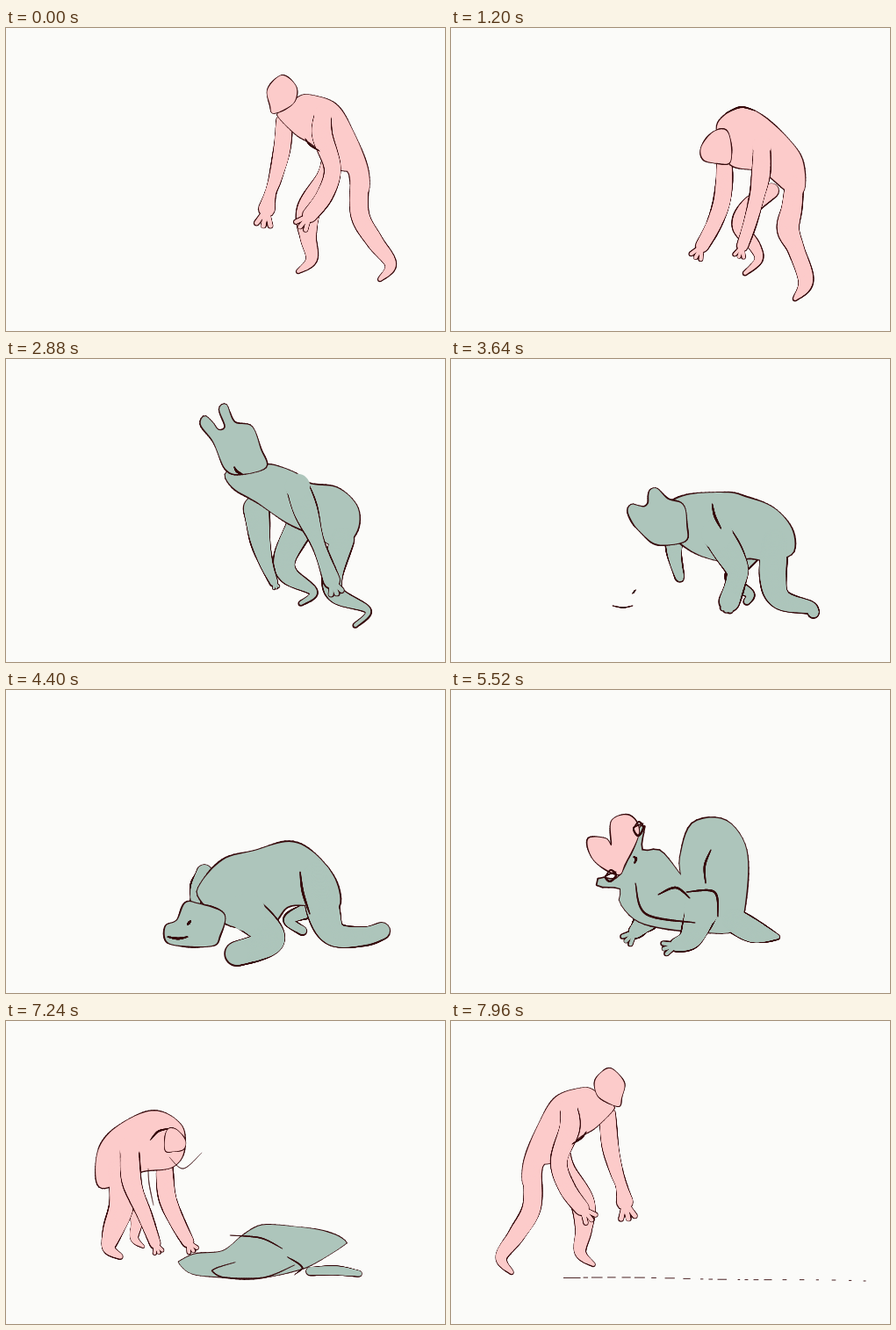
Write an HTML page with a canvas that moves like this. It is 500 px wide and 345 px high and loops after 8000 ms.

```html
<!DOCTYPE html>
<html lang="en">
<head>
<meta charset="utf-8">
<title>Shape shifter</title>
<style>
html, body { margin: 0; width: 100%; height: 100%; overflow: hidden; background: #fbfbf9; }
canvas { display: block; width: 100vw; height: 100vh; }
</style>
</head>
<body>
<canvas id="stage"></canvas>
<script>
const W = 500, H = 345, LOOP = 8000, STEP = 120;
const PAPER = '#fbfbf9', INK = '#360a0c';
const PINK = [252, 203, 202], GREEN = [173, 197, 187];

const clamp = v => Math.max(0, Math.min(1, v));
const mix = (a, b, u) => a + (b - a) * u;
const isLimb = name => /^(arm|leg)/.test(name);
const isLine = name => /^mark/.test(name);

// Limbs are joints x,y,radius; torso and head are outlines; marks are creases.
const parse = text => Object.fromEntries(text.trim().split('\n').map((row, i) => {
  const [name, ...points] = row.trim().split(/\s+/);
  return [name === 'mark' ? name + i : name, points.map(p => p.split(',').map(Number))];
}));

const stand = parse(`
  legF 370,145,9 364,170,10 345,207,13 344,237,9 348,263,6 333,277,2
  armF 317,106,9 314,140,9 307,170,7 301,188,6 297,206,9
  torso 309,99 318,93 331,80 345,76 376,87 396,119 412,160 412,188 395,184 390,164 378,160 351,134 330,121
  legN 403,168,10 403,212,10 420,243,9 438,269,6 426,286,2
  head 314,54 330,66 329,83 318,92 304,97 301,88 298,70
  armN 361,98,9 360,122,11 372,160,9 363,190,9 346,213,8
  mark 341,126 346,133 357,140`);

const stoop = parse(`
  legF 365,185,8 340,204,10 330,226,9 346,249,6 350,264,4 335,279,2
  armF 311,150,8 311,175,9 308,200,9 299,224,8 286,248,7
  torso 303,118 310,101 331,91 352,98 382,124 400,150 402,185 385,187 355,164 318,155
  legN 391,178,10 388,205,11 384,229,12 393,252,9 404,288,8 392,308,2
  head 312,116 298,119 285,136 288,150 305,154 318,152 318,128
  armN 354,134,9 353,165,10 349,190,8 341,220,7 332,248,6
  mark 313,97 330,90 346,94`);

const beast = parse(`
  legF 335,190,15 318,225,12 322,246,10 350,265,4 336,278,2
  armF 285,170,14 289,203,11 296,232,7 305,254,4
  torso 252,128 295,120 328,129 346,142 378,147 400,168 400,195 380,215 350,200 318,185 286,163 258,146
  legN 383,205,13 372,245,11 377,269,9 412,286,3 398,303,2
  head 236,94 222,75 226,65 235,72 242,81 250,77 243,57 251,52 260,72 280,77 290,103 296,123 268,131 250,125
  armN 332,145,12 341,172,13 356,212,7 371,252,9
  mark 260,123 263,128 269,131`);

const crawl = parse(`
  legF 345,250,8 322,262,5 338,274,4
  armF 226,207,8 217,225,6 216,242,5
  torso 221,238 222,220 248,193 283,183 322,173 350,185 375,216 378,248 345,245 320,247 300,268 255,268
  legN 354,212,16 361,250,18 374,278,13 408,280,10 428,274,9
  head 217,243 204,243 195,262 182,269 183,286 200,291 235,291 243,280 248,255
  armN 274,253,19 302,284,15 263,300,13
  mark 335,207 338,230 346,255
  mark 184,281 196,283 207,281
  mark 207,267 210,263`);

const gape = parse(`
  armF 225,260,12 210,275,7
  torso 193,226 168,223 170,214 190,214 205,186 207,170 220,153 217,182 238,183 258,206 262,212 261,190 275,152 312,148 336,180 336,235 325,272 290,276 220,266 193,243
  legN 322,262,13 345,275,12 372,281,2
  armN 285,250,18 274,281,12 257,290,7
  mark 210,220 222,255 278,265
  mark 268,230 300,230 304,258
  mark 208,190 211,192 209,197
  mark 236,233 256,225 272,237
  mark 296,182 289,200 290,220`);

const husk = parse(`
  torso 247,188 262,161 304,165 338,177 354,202 334,253 310,276 265,295 230,290 195,283 188,265 205,234 240,225
  legN 318,275,9 345,274,10 366,281,6
  mark 240,186 275,193 291,219
  mark 296,240 311,262 303,284
  mark 303,260 275,291 228,290 224,270 245,253`);

const bud = parse(`
  torso 190,210 163,194 156,170 176,169 183,177 183,149 203,143 214,162 198,198
  mark 208,157 214,150 219,157 213,166 208,157 219,152
  mark 176,212 182,205 188,211 181,218 176,212 188,207`);

const emerge = parse(`
  torso 160,88 193,70 217,104 220,160 198,212 160,190 143,122
  mark 156,135 181,150 192,138
  mark 192,150 200,174 199,202`);

const pull = parse(`
  armF 172,165,9 177,205,10 191,236,8 203,257,5
  torso 123,150 137,128 172,123 212,137 236,172 218,188 160,185 130,190
  legN 212,165,22 219,205,20 229,234,12 262,229,4
  armN 140,168,12 144,205,12 168,233,9 185,264,5
  mark 186,155 202,168 223,150
  mark 162,168 163,185 168,210
  mark 190,178 190,200 198,225`);

// Derived poses.
const warp = (pose, fn) => Object.fromEntries(Object.entries(pose).map(([k, path]) => [k, path.map(fn)]));
const mirror = pose => warp(pose, ([x, ...rest]) => [495 - x, ...rest]);
const legs = ({ legF, legN }) => ({ legF, legN });
const stride = { ...stand, ...legs(stoop) };
const tall = warp(stride, ([x, y, ...r]) => {
  const a = .45 * clamp((215 - y) / 60), dx = x - 392, dy = y - 190;
  return [392 + dx * Math.cos(a) - dy * Math.sin(a), 190 + (dy * Math.cos(a) + dx * Math.sin(a)) * (1 + a * .22), ...r];
});
const flat = warp(husk, ([x, y, ...r]) => [200 + (x - 188) * 1.3, 293 + (y - 293) * .02, ...r.map(v => v * .05)]);
const seed = warp(bud, ([x, y]) => [mix(196, x, .1), mix(196, y, .1)]);
const rising = mirror({ ...stoop, ...legs(stand) });

// Catmull-Rom through the points, resampled at equal distances.
function sample(p, closed, n) {
  const at = i => closed ? p[(i + p.length) % p.length] : p[Math.max(0, Math.min(p.length - 1, i))];
  const fine = [], segs = closed ? p.length : p.length - 1;
  for (let i = 0; i < segs; i++) {
    const [a, b, c, d] = [at(i - 1), at(i), at(i + 1), at(i + 2)];
    for (let t = 0; t < 1; t += 1 / 16)
      fine.push(b.map((v, j) => v + t / 2 * (c[j] - a[j] + t * (2 * a[j] - 5 * v + 4 * c[j] - d[j] + t * (3 * (v - c[j]) + d[j] - a[j])))));
  }
  fine.push(at(segs));
  const len = [0];
  for (let i = 1; i < fine.length; i++) len.push(len[i - 1] + Math.hypot(fine[i][0] - fine[i - 1][0], fine[i][1] - fine[i - 1][1]));
  const total = len[len.length - 1];
  let j = 1;
  return Array.from({ length: n }, (_, i) => {
    const d = total * i / (closed ? n : n - 1);
    while (j < fine.length - 1 && len[j] < d) j++;
    const u = clamp((d - len[j - 1]) / (len[j] - len[j - 1] || 1));
    return fine[j].map((v, k) => mix(fine[j - 1][k], v, u));
  });
}

// A missing part shrinks to its middle, with no thickness.
function collapse(p) {
  const mean = k => p.reduce((s, q) => s + q[k], 0) / p.length;
  return p.map(q => q.length > 2 ? [mean(0), mean(1), 0] : [mean(0), mean(1)]);
}

// Rotates and orients outline b so that it lies nearest to a.
function align(a, b) {
  const n = a.length;
  let best = b, low = Infinity;
  for (const c of [b, [...b].reverse()]) {
    for (let s = 0; s < n; s++) {
      const sum = a.reduce((v, [x, y], i) => v + (x - c[(i + s) % n][0]) ** 2 + (y - c[(i + s) % n][1]) ** 2, 0);
      if (sum < low) { low = sum; best = [...c.slice(s), ...c.slice(0, s)]; }
    }
  }
  return best;
}

function pair(name, a, b) {
  const closed = !isLimb(name) && !isLine(name);
  const from = a && sample(a, closed, 90), to = b && sample(b, closed, 90);
  const rest = isLine(name) ? p => p : collapse;
  return {
    from: from || rest(to),
    to: from && to && closed ? align(from, to) : to || rest(from),
    seen: [a ? 1 : 0, b ? 1 : 0]
  };
}

// Keys: time, pose, ink weight, finger length.
const track = keys => keys.slice(1).map(([end, pose, ...look], i) => {
  const [start, prev, ...was] = keys[i];
  const names = [...new Set([...Object.keys(prev), ...Object.keys(pose)])];
  return { start, end, was, look, parts: names.map(n => [n, pair(n, prev[n], pose[n])]) };
});

const creature = track([
  [0, stand, 1.1, 1], [600, stride, 1.2, 1], [1200, stoop, 1.3, 1], [1560, stoop, 1.3, 1], [2040, tall, 1.3, 1],
  [2880, beast, 1.6, .8], [4320, crawl, 1.8, 0], [5280, gape, 1.6, 1], [5520, gape, 1.6, 1], [6600, husk, 1.4, 0], [7720, flat, .8, 0]
]);
const newborn = track([
  [5000, seed, .8, 0], [5520, bud, 1.5, 0], [6120, emerge, 1.4, 0], [6600, pull, 1.4, .6], [7560, rising, 1.3, 1], [7920, mirror(stand), 1.1, 1]
]);

const canvas = document.getElementById('stage'), g = canvas.getContext('2d');

function dot(x, y, r) {
  g.beginPath();
  g.arc(x, y, Math.max(0, r), 0, 7);
  g.fill();
}

// A brush line whose pressure swells and fades along the way.
function brush(p, w, pressure) {
  g.strokeStyle = INK;
  g.lineCap = 'round';
  for (let i = 1; i < p.length; i++) {
    g.lineWidth = Math.max(.1, w * pressure(i / p.length));
    g.beginPath();
    g.moveTo(p[i - 1][0], p[i - 1][1]);
    g.lineTo(p[i][0], p[i][1]);
    g.stroke();
  }
}

function fingers(p, grip) {
  const [x, y, r] = p[p.length - 1], [bx, by] = p[p.length - 9];
  const heading = Math.atan2(y - by, x - bx), out = [];
  for (let k = -1; k <= 1; k++)
    for (let d = .4; d < 2.3 * grip; d += .1)
      out.push([x + Math.cos(heading + k * .42) * d * r, y + Math.sin(heading + k * .42) * d * r, r * .27]);
  return out;
}

// All ink goes down before all colour, so that joined parts share one outline.
function paint(group, color) {
  for (const { limb, path, w } of group) {
    g.fillStyle = INK;
    if (limb) path.forEach(([x, y, r], i) => dot(x + w * .35 * Math.sin(i / 9), y + w * .35 * Math.cos(i / 13), r + w * .8));
    else brush([...path, path[0]], w * 2, u => .8 + .25 * Math.sin(u * 31));
  }
  g.fillStyle = color;
  for (const { limb, path } of group) {
    if (limb) { path.forEach(q => dot(...q)); continue; }
    g.beginPath();
    path.forEach(q => g.lineTo(...q));
    g.fill();
  }
}

function drawTrack(segs, t, rgb) {
  const color = `rgb(${rgb})`;
  const s = segs.find(k => t <= k.end) || segs[segs.length - 1];
  const r = clamp((t - s.start) / (s.end - s.start)), u = r * r * (3 - 2 * r);
  const [weight, grip] = s.was.map((v, i) => mix(v, s.look[i], u));
  const parts = {}, marks = [];
  for (const [name, { from, to, seen }] of s.parts) {
    const path = from.map((p, i) => p.map((v, k) => mix(v, to[i][k], u)));
    const part = { limb: isLimb(name), path, w: weight * mix(...seen, u) };
    if (name.startsWith('arm')) path.push(...fingers(path, grip));
    if (isLine(name)) marks.push(part); else parts[name] = part;
  }
  for (const names of [['legF'], ['armF'], ['torso', 'legN'], ['head'], ['armN']])
    paint(names.map(n => parts[n]).filter(Boolean), color);
  // The near shoulder stays open towards the body.
  if (parts.armN) {
    const [x, y, size] = parts.armN.path[0];
    dot(x, y, size + parts.armN.w * 1.4);
  }
  for (const m of marks) if (m.w > .3) brush(m.path, m.w * 1.3, v => .5 + .6 * Math.sin(Math.PI * v));
}

// Broken ground line that thins out to the right.
function drawGround() {
  const noise = i => Math.abs(Math.sin(i * 12.9898) * 43758.5453) % 1;
  g.strokeStyle = INK;
  g.lineCap = 'butt';
  g.lineWidth = .9;
  for (let x = 128, i = 1; x < 470; i++) {
    const far = (x - 128) / 342, dash = mix(16, 3, far) * (.3 + noise(i));
    const y = 292.5 + 4 * far * far + Math.sin(x / 40) * .7;
    g.beginPath();
    g.moveTo(x, y);
    g.lineTo(x + dash, y);
    g.stroke();
    x += dash + mix(5, 14, far) * (.5 + noise(i + 50));
  }
}

function draw(t) {
  g.setTransform(canvas.width / W, 0, 0, canvas.height / H, 0, 0);
  g.fillStyle = PAPER;
  g.fillRect(0, 0, W, H);
  const turn = clamp((t - 2000) / 500);
  if (t < 7840) drawTrack(creature, t, PINK.map((c, i) => Math.round(mix(c, GREEN[i], turn))));
  else drawGround();
  if (t > 5000) drawTrack(newborn, t, PINK);
}

let shown = -1;
function fit() {
  const d = devicePixelRatio || 1;
  canvas.width = Math.round(innerWidth * d);
  canvas.height = Math.round(innerHeight * d);
  shown = -1;
}
addEventListener('resize', fit);
fit();

const begin = performance.now();
function tick() {
  const now = (performance.now() - begin) % LOOP;
  const t = Math.floor(now / STEP) * STEP;
  if (t !== shown) draw(shown = t);
  requestAnimationFrame(tick);
}
tick();
</script>
</body>
</html>
```
